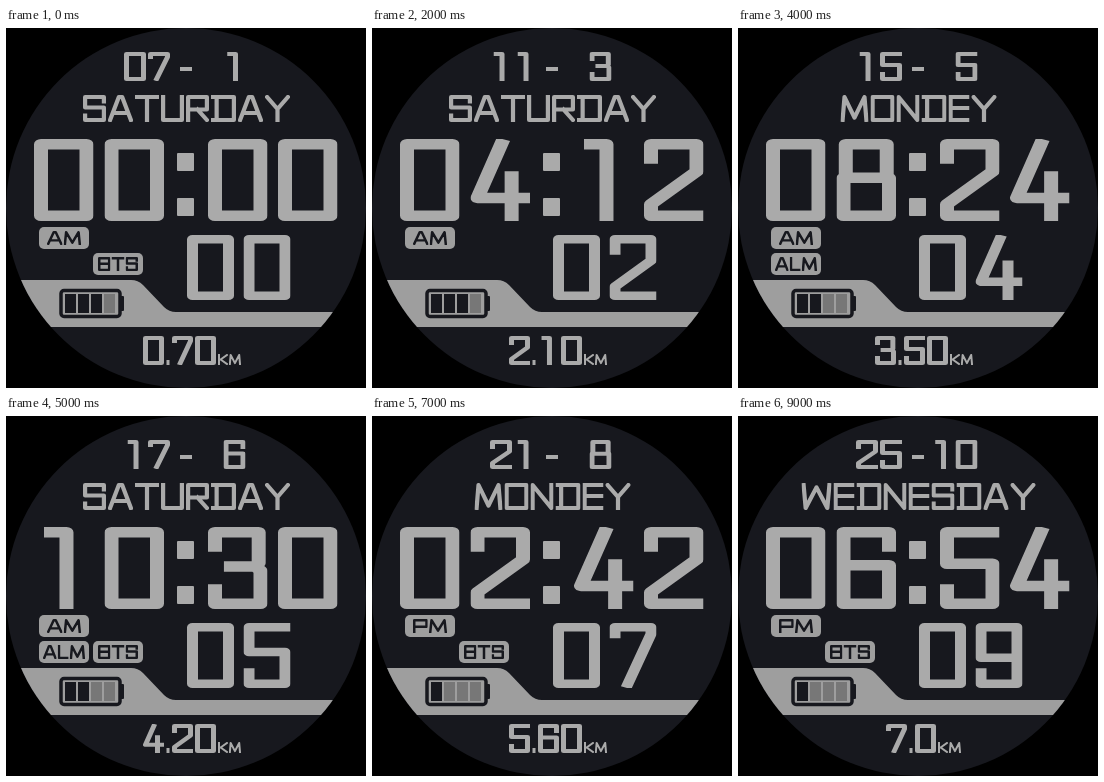
These frames come from a looping animation (360x360 px, 10 s). An HTML page with a canvas:

```html
<!DOCTYPE html>
<html lang="en">
<head>
<meta charset="utf-8">
<title>Digital watch face</title>
<style>
  html, body { margin: 0; width: 100%; height: 100%; overflow: hidden; background: #000; }
  canvas { display: block; width: 100vmin; height: 100vmin; }
</style>
</head>
<body>
<canvas id="face" width="360" height="360" role="img" aria-label="Digital watch face"></canvas>
<script>
const ctx = document.getElementById('face').getContext('2d');
const DARK = '#17181e', LIGHT = '#aaaaaa', BAND = '#9e9e9e', FADED = '#777777';

// Glyphs are pen strokes in a unit box; each stroke is a list of "x,y" points.
const LEFT = '0,0 0,1', RIGHT = '1,0 1,1', TOP = '0,0 1,0', BOTTOM = '0,1 1,1';
const MIDDLE = '0,.48 1,.48', STEM = '.5,0 .5,1';
const BOX = '0,0 1,0 1,1 0,1 0,0';
const parse = strokes => strokes.map(s => s.split(' ').map(p => p.split(',').map(Number)));
const turn = glyph => glyph.map(s => s.map(([x, y]) => [1 - x, 1 - y]));

const glyphs = {
  0: [BOX],
  1: ['.22,0 .56,0 .56,1'],
  2: ['0,.2 0,0 1,0 1,.38 0,.84 0,1 1,1'],
  3: ['0,.2 0,0 .96,0 .96,.43 .9,.48 .35,.48', '.9,.48 1,.54 1,1 0,1 0,.8'],
  4: ['.52,0 0,.75 1,.75', '.75,.45 .75,1'],
  5: ['1,0 0,0 0,.44 1,.44 1,1 0,1 0,.8'],
  6: ['1,.2 1,0 0,0 0,1 1,1 1,.46 0,.46'],
  7: ['0,.12 0,0 1,0 1,.12 .36,1'],
  8: ['.05,.47 .05,0 .95,0 .95,.47', '0,.47 1,.47 1,1 0,1 0,.47'],
  A: ['0,1 .42,0 .58,0 1,1', '.18,.7 .82,.7'],
  B: [BOX, MIDDLE],
  D: ['0,0 1,0 1,1 0,1', '.17,0 .17,1'],
  E: [LEFT, TOP, MIDDLE, BOTTOM],
  H: [LEFT, RIGHT, MIDDLE],
  K: [LEFT, '1,0 .2,.5 1,1'],
  L: ['0,0 0,1 1,1'],
  M: ['0,1 .08,0 .5,.9 .92,0 1,1'],
  N: ['0,1 0,0 1,1 1,0'],
  O: [BOX],
  P: ['0,1 0,0 1,0 1,.56 0,.56'],
  R: ['0,1 0,0 1,0 1,.54 0,.54', '.5,.54 1,1'],
  S: ['1,.2 1,0 0,0 0,.46 1,.46 1,1 0,1 0,.8'],
  T: [TOP, STEM],
  U: ['0,0 0,1 1,1 1,0'],
  Y: ['0,0 .5,.52 1,0', '.5,.52 .5,1']
};
for (const key in glyphs) glyphs[key] = parse(glyphs[key]);
glyphs[9] = turn(glyphs[6]);
glyphs.W = turn(glyphs.M);

const letterWidths = { A: 25, T: 24, D: 25, Y: 25, M: 28, O: 24, E: 21, W: 30, L: 20 };
const LETTER_GAP = 2;
const letterWidth = c => letterWidths[c] || 23;
const wordWidth = word =>
  [...word].reduce((sum, c) => sum + letterWidth(c) + LETTER_GAP, -LETTER_GAP);

function drawGlyph(char, x, y, w, h, penX, penY, color) {
  ctx.save();
  ctx.beginPath();
  ctx.rect(x, y, w, h);
  ctx.clip();
  ctx.beginPath();
  for (const stroke of glyphs[char]) {
    stroke.forEach(([u, v], i) => {
      const px = x + penX / 2 + u * (w - penX), py = y + penY / 2 + v * (h - penY);
      i ? ctx.lineTo(px, py) : ctx.moveTo(px, py);
    });
    if (stroke[0].join() === stroke[stroke.length - 1].join()) ctx.closePath();
  }
  // The path keeps its place; only the pen becomes wider than tall.
  ctx.scale(penX / penY, 1);
  ctx.lineWidth = penY;
  ctx.lineJoin = 'round';
  ctx.lineCap = 'square';
  ctx.strokeStyle = color;
  ctx.stroke();
  ctx.restore();
}

function drawDigits(text, x, y, w, h, advance, penX, penY) {
  [...text].forEach((c, i) => {
    if (c !== ' ') drawGlyph(c, x + i * advance, y, w, h, penX, penY, LIGHT);
  });
}

function drawWord(word, centerX, y, width, h, pen, color) {
  const scale = width / wordWidth(word);
  let x = centerX - width / 2;
  for (const c of word) {
    drawGlyph(c, x, y, letterWidth(c) * scale, h, pen, pen * 0.95, color);
    x += (letterWidth(c) + LETTER_GAP) * scale;
  }
}

function fillRect(x, y, w, h, color, radius = 0) {
  ctx.fillStyle = color;
  ctx.beginPath();
  ctx.roundRect(x, y, w, h, radius);
  ctx.fill();
}

function drawPill(word, x, y, textWidth) {
  fillRect(x, y, 50, 22, BAND, 5);
  drawWord(word, x + 25, y + 4, textWidth, 14, 2.5, DARK);
}

function drawBand() {
  ctx.fillStyle = BAND;
  ctx.beginPath();
  ctx.moveTo(0, 252);
  ctx.lineTo(125, 252);
  ctx.quadraticCurveTo(132, 252, 137, 257);
  ctx.lineTo(158, 279);
  ctx.quadraticCurveTo(163, 284, 170, 284);
  ctx.lineTo(360, 284);
  ctx.lineTo(360, 299);
  ctx.lineTo(0, 299);
  ctx.fill();
}

function drawBattery(bars) {
  ctx.strokeStyle = DARK;
  ctx.lineWidth = 3.5;
  ctx.beginPath();
  ctx.roundRect(55, 262.5, 59, 26, 3);
  ctx.stroke();
  fillRect(114, 268, 4, 15, DARK, 1);
  for (let i = 0; i < 4; i++) fillRect(59 + i * 13, 266, 11, 19, i < bars ? DARK : FADED);
}

function drawDistance(text) {
  const [whole, fraction] = text.split('.');
  const x = fraction.length > 1 ? 137 : 148;
  drawDigits(whole, x, 308, 21, 29, 23, 5, 4);
  fillRect(x + 23.5, 332, 3, 5, LIGHT);
  drawDigits(fraction, x + 29, 308, 21, 29, 23, 5, 4);
  drawWord('KM', x + 40.5 + fraction.length * 23, 326, 23, 11, 2, LIGHT);
}

const two = n => String(n).padStart(2, '0');
const weekdays = ['SUNDAY', 'MONDEY', 'TUESDAY', 'WEDNESDAY', 'THURSDAY', 'FRIDAY', 'SATURDAY'];

function drawFace(step) {
  const day = 7 + 2 * step, month = step + 1;
  const weekday = weekdays[new Date(2017, month - 1, day).getDay()];

  ctx.clearRect(0, 0, 360, 360);
  ctx.save();
  ctx.beginPath();
  ctx.arc(180, 180, 180, 0, 2 * Math.PI);
  ctx.fillStyle = DARK;
  ctx.fill();
  ctx.clip();
  drawBand();
  ctx.restore();

  drawDigits(two(day), 118, 24, 22, 29, 24, 5, 4);
  fillRect(174, 39, 12, 4, LIGHT);
  drawDigits(String(month).padStart(2), 193.5, 24, 22, 29, 24, 5, 4);
  drawWord(weekday, 180.5, 67, wordWidth(weekday), 27, 4.2, LIGHT);

  drawDigits(two(step * 2 % 12), 28, 111, 59.5, 82, 70.5, 14, 10.5);
  drawDigits(two(step * 6), 202, 111, 59.5, 82, 70, 14, 10.5);
  fillRect(171, 125, 17, 18, LIGHT, 1);
  fillRect(171, 170, 17, 18, LIGHT, 1);
  drawDigits(two(step), 181, 207, 47, 65, 56.5, 11, 8.5);

  drawPill(step < 6 ? 'AM' : 'PM', 33, 199, 34);
  if (step >= 3 && step <= 6) drawPill('ALM', 33, 225, 42);
  if (step < 1 || step > 4) drawPill('BTS', 87, 225, 40);
  drawBattery(step < 3 ? 3 : step < 6 ? 2 : 1);
  drawDistance(step < 9 ? (0.7 * month).toFixed(2) : '7.0');
}

function tick() {
  drawFace(Math.floor(performance.now() / 1000) % 10);
  requestAnimationFrame(tick);
}
tick();
</script>
</body>
</html>
```
